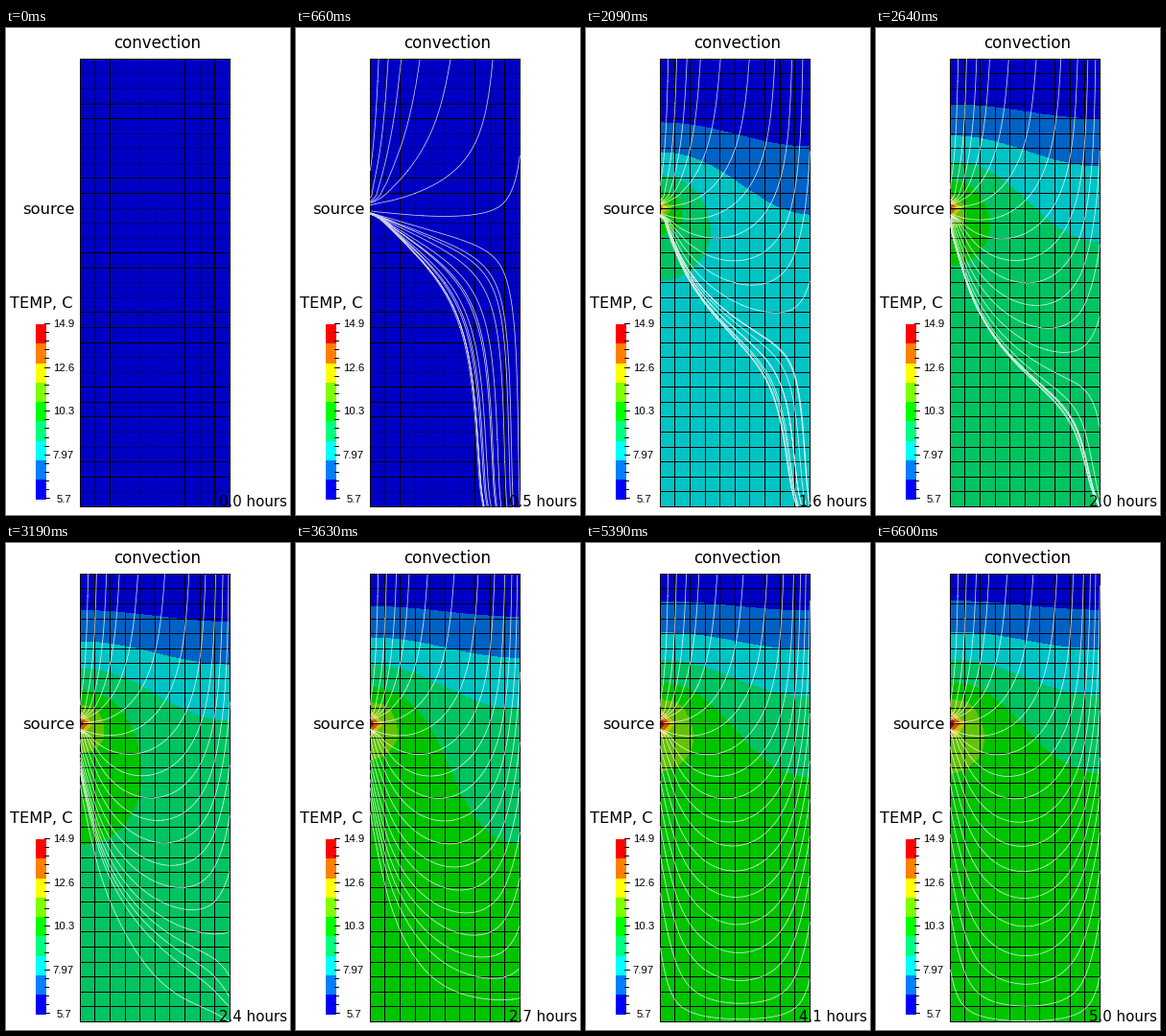
Animation of 296 by 508 pixels, one loop 6710 ms. Source, as a matplotlib script:

```python
import numpy as np
import matplotlib.pyplot as plt
from matplotlib.animation import FuncAnimation
from matplotlib.patches import Rectangle

W, H, DPI = 296, 508, 100
FRAMES, INTERVAL = 61, 110
PX = 72 / DPI                       # one pixel in points

NX, NY = 10, 30                     # elements across and down
LEFT, TOP, CELL_X, CELL_Y = 77.3, 32.3, 15.6, 15.57
HEATER = np.array([0, 10])
T_MIN, T_MAX = 5.7, 14.9

FILM = 0.0755                       # convection at the top edge
DIFFUSIVITY = 1111.0                # cells^2 per hour
RAMP = 0.85                         # hours until the heater is at full power
SUBSTEPS = 10

BANDS = np.array([(0, 0, 1), (0, .5, 1), (0, 1, 1), (0, 1, .5), (0, 1, 0),
                  (.5, 1, 0), (1, 1, 0), (1, .5, 0), (1, 0, 0)])
SHADE = 0.77
STRONG_COLS = {0, 2, 3, 6, 7, 9, 10}
STRONG_ROWS = {0, 3, 4, 8, 9, 13, 14, 17, 18, 19, 22, 23, 24, 27, 28, 30}


def node(i, j):
    return j * (NX + 1) + i


def assemble():
    """Stiffness matrix and lumped mass for square bilinear elements."""
    size = (NX + 1) * (NY + 1)
    stiff, mass = np.zeros((size, size)), np.zeros(size)
    row = np.array([4, -1, -2, -1]) / 6
    local = np.array([np.roll(row, k) for k in range(4)])
    for j in range(NY):
        for i in range(NX):
            ids = [node(i, j), node(i + 1, j), node(i + 1, j + 1), node(i, j + 1)]
            stiff[np.ix_(ids, ids)] += local
            mass[ids] += 0.25
    for i in range(NX):
        for k in (node(i, 0), node(i + 1, 0)):
            stiff[k, k] += FILM / 2
    return stiff, mass


def simulate():
    """Temperature fields, five minutes apart."""
    stiff, mass = assemble()
    load = np.zeros(len(mass))
    load[node(*HEATER)] = 1
    steady = np.linalg.solve(stiff, load)
    scale = (T_MAX - T_MIN) / np.ptp(steady)

    dt = 1 / 12 / SUBSTEPS
    inverse = np.linalg.inv(np.diag(mass / dt) + DIFFUSIVITY * stiff)
    u, fields = np.zeros(len(mass)), []
    for k in range(FRAMES * SUBSTEPS):
        if k % SUBSTEPS == 0:
            temp = T_MIN + scale * (u - steady.min())
            fields.append(temp.reshape(NY + 1, NX + 1))
        power = min((k + 1) * dt / RAMP, 1)
        u = inverse @ (mass / dt * u + DIFFUSIVITY * power * load)
    return fields


def direction(flow, p):
    """Unit flow vectors at points p, bilinear inside each cell."""
    i = np.clip(p[:, 0].astype(int), 0, NX - 1)
    j = np.clip(p[:, 1].astype(int), 0, NY - 1)
    a, b = (p[:, 0] - i)[:, None], (p[:, 1] - j)[:, None]
    v = ((1 - b) * ((1 - a) * flow[j, i] + a * flow[j, i + 1])
         + b * ((1 - a) * flow[j + 1, i] + a * flow[j + 1, i + 1]))
    return v / (np.hypot(v[:, 0], v[:, 1])[:, None] + 1e-12)


def streamlines(temp, step=0.1, length=30):
    """Trace heat flow both ways from seeds on the diagonal."""
    gy, gx = np.gradient(temp)
    flow = -np.dstack([gx, gy])
    seeds = np.linspace((0, 0), (NX, NY), 21)
    pos = np.vstack([seeds, seeds])
    sign = np.repeat([step, -step], len(seeds))[:, None]
    alive = np.ones(len(pos), bool)
    path = [pos]
    for _ in range(int(length / step)):
        mid = pos + direction(flow, pos) * sign / 2
        new = pos + direction(flow, mid) * sign
        alive &= ((new >= 0) & (new <= (NX, NY))).all(axis=1)
        alive &= np.hypot(*(new - HEATER).T) > 0.2
        if not alive.any():
            break
        pos = np.where(alive[:, None], new, pos)
        path.append(np.where(alive[:, None], pos, np.nan))
    path.append(np.full_like(pos, np.nan))
    lines = np.array(path).transpose(1, 0, 2).reshape(-1, 2)
    return LEFT + CELL_X * lines[:, 0], TOP + CELL_Y * lines[:, 1]


fig = plt.figure(figsize=(W / 100, H / 100), dpi=DPI, facecolor="white")
ax = fig.add_axes([0, 0, 1, 1])
ax.set_xlim(0, W)
ax.set_ylim(H, 0)
ax.axis("off")


def label(x, y, text, size, ha="left", font="DejaVu Sans"):
    return ax.text(x, y, text, fontsize=size * PX, family=font, ha=ha,
                   va="baseline", color="black", zorder=5)


def box(x, y, w, h, color, z=2):
    patch = Rectangle((x, y), w, h, fc=color, lw=0, antialiased=False, zorder=z)
    return ax.add_patch(patch)


def draw_mesh():
    """Draw the element edges; return those that start out faint."""
    faint = []
    right, bottom = int(LEFT + NX * CELL_X), int(TOP + NY * CELL_Y)
    x0, y0 = int(LEFT), int(TOP)
    for i in range(NX + 1):
        edge = box(int(LEFT + i * CELL_X), y0, 1, bottom - y0 + 1, "black")
        if i not in STRONG_COLS:
            faint.append(edge)
    for j in range(NY + 1):
        edge = box(x0, int(TOP + j * CELL_Y), right - x0 + 1, 1, "black")
        if j not in STRONG_ROWS:
            faint.append(edge)
    for edge in faint:
        edge.set_zorder(1.9)
    return faint


def draw_legend():
    top, bottom = 309, 491.5
    edges = np.linspace(bottom, top, len(BANDS) + 1).round()
    for color, low, high in zip(BANDS, edges, edges[1:]):
        box(31, high, 11, low - high, color)
    for k in range(21):
        y = int(308.5 + k * 9.12)
        box(40, y, 6 if k % 5 == 0 else 5, 1, "black", 3)
    for k, text in enumerate(["14.9", "12.6", "10.3", "7.97", "5.7"]):
        label(60, 312 + k * 45.7, text, 11.4, "center", "Liberation Sans")


fields = simulate()
levels = np.linspace(T_MIN, T_MAX, len(BANDS) + 1)
levels[0], levels[-1] = -99, 99
xs = LEFT + CELL_X * np.arange(NX + 1)
ys = TOP + CELL_Y * np.arange(NY + 1)

faint_edges = draw_mesh()
draw_legend()
label(157.5, 21, "convection", 16.8, "center")
label(17, 194, "source", 16.4)
label(4, 292, "TEMP, C", 16.2)
clock = label(222, 499, "", 15)
flow_lines, = ax.plot([], [], color="white", lw=0.8 * PX, alpha=0.8, zorder=4)
bands = []


def update(n):
    while bands:
        bands.pop().remove()
    bands.append(ax.contourf(xs, ys, fields[n], levels=levels,
                             colors=BANDS * SHADE, zorder=1))
    for edge in faint_edges:
        edge.set_facecolor((0, 0, 0.5) if n < 14 else "black")
    if n:
        flow_lines.set_data(*streamlines(fields[n]))
    else:
        flow_lines.set_data([], [])
    clock.set_text(f"{abs(n / 12 - 1e-6):.1f} hours")


anim = FuncAnimation(fig, update, frames=FRAMES, interval=INTERVAL,
                     init_func=lambda: [], repeat=True, repeat_delay=0)
plt.show()
```
